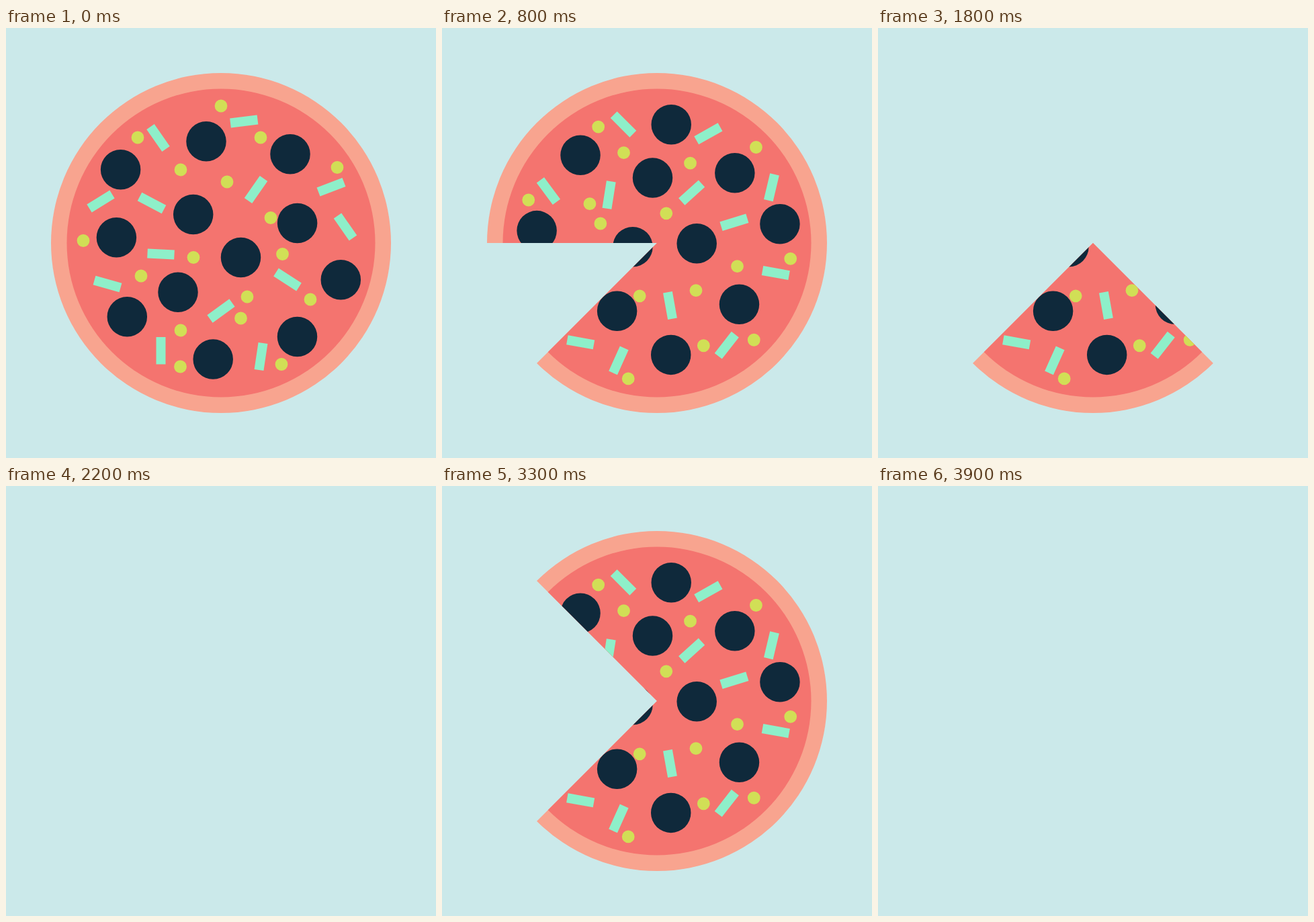
An HTML page for the animation above (4.3 s loop, 640x640 px).

```html
<!DOCTYPE html>
<html lang="en">
<head>
<meta charset="utf-8">
<title>Pizza</title>
<style>
  html, body { margin: 0; width: 100%; height: 100%; overflow: hidden; background: #cbe9ea; }
  svg { display: block; width: 100vw; height: 100vh; }
  .crust { fill: #f8a48f; }
  .sauce { fill: #f4746f; }
  path { fill: none; }
  .olives { stroke: #0f293b; stroke-width: 59.5; stroke-linecap: round; }
  .corn { stroke: #d1df56; stroke-width: 18.8; stroke-linecap: round; }
  .peppers { stroke: #8eefc9; stroke-width: 14; }
</style>
</head>
<body>
<svg viewBox="0 0 640 640">
  <clipPath id="left"><path id="wedge"/></clipPath>
  <g id="pizza">
    <circle class="crust" cx="320" cy="320" r="253"/>
    <circle class="sauce" cx="320" cy="320" r="229.5"/>
    <g id="toppings">
      <path class="olives" d="M298 168.8h0M423 187.7h0M170.6 210.7h0M278.7 277.6h0M164.4 311.8h0M433.6 290.4h0
        M349.5 341.5h0M498.3 374.7h0M256 393.2h0M180.3 429.7h0M433.5 459.5h0M308.2 493h0"/>
      <path class="corn" d="M320 116h0M196 163h0M379 163h0M260 211h0M493 207.5h0M329 229h0M394 282.5h0M115 316.5h0
        M279 341.5h0M411.5 336.5h0M201 369h0M359 400h0M453 404h0M349.5 432h0M260 450h0M259.5 504h0M410 500.5h0"/>
      <path class="peppers" d="M215 147l23 33M334 141.5l40.5-5M360.5 257l23-33M465 244l38-14.5M493.5 279.5l23 33
        M124 268.5l34-21M199 251l36 19M210.5 335.5l40 2M402 363.5l34 22M131.5 375.5l39 11M303.5 433l33-24
        M230.5 460v40.5M382.5 469l-6 40"/>
    </g>
  </g>
</svg>
<script>
  const LOOP = 4300, REGROW = 2500, C = 320, SLICES = 8;
  const $ = id => document.getElementById(id);
  const clamp = n => Math.max(0, Math.min(SLICES, n));

  // Eighth turns made and slices eaten at time t
  function stateAt(t) {
    if (t < REGROW) {
      const beat = Math.floor(t / 200);
      return { turn: Math.min(3, beat), eaten: clamp(beat - 3) };
    }
    // Grows back, shows whole and unturned for one step, then is eaten again
    const step = Math.floor((t - REGROW) / 100) - 7;
    return { turn: step ? 3 : 0, eaten: clamp(step > 0 ? step + 1 : -step) };
  }

  // Slices go clockwise, starting at the lower left
  function wedgePath(eaten) {
    let d = `M${C} ${C}`;
    for (let i = eaten; i <= SLICES; i++) {
      const a = (i + 3) * Math.PI / 4;
      d += `L${(C + 400 * Math.cos(a)).toFixed(3)} ${(C + 400 * Math.sin(a)).toFixed(3)}`;
    }
    return d + 'Z';
  }

  function draw() {
    const { turn, eaten } = stateAt(performance.now() % LOOP);
    $('toppings').setAttribute('transform', `rotate(${turn * 45} ${C} ${C})`);
    $('wedge').setAttribute('d', wedgePath(eaten));
    $('pizza').setAttribute('clip-path', eaten ? 'url(#left)' : 'none');
    $('pizza').setAttribute('visibility', eaten < SLICES ? 'visible' : 'hidden');
    requestAnimationFrame(draw);
  }
  draw();
</script>
</body>
</html>
```
